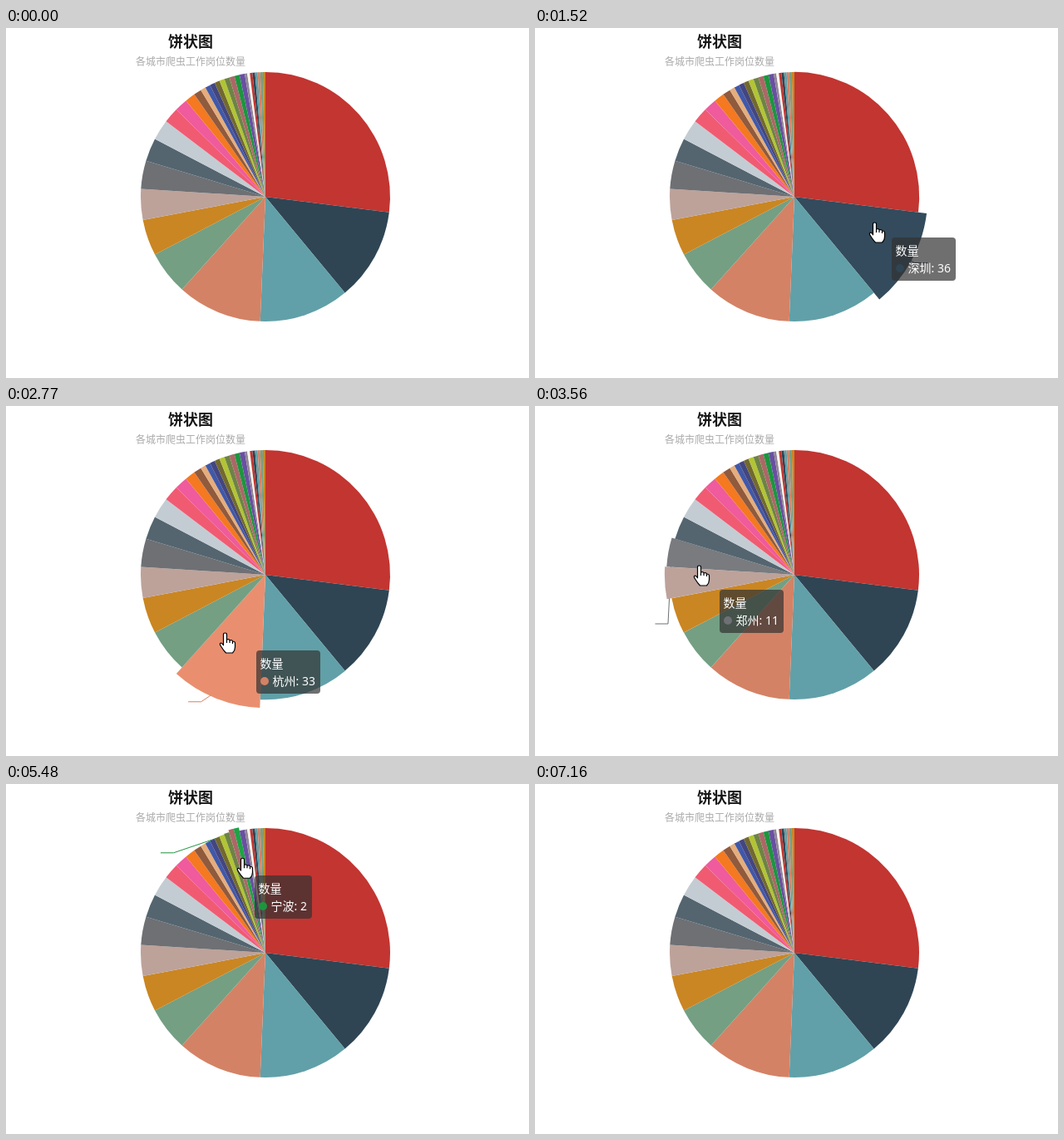
An HTML page that plays this animation: 629 by 421 pixels, repeating every 7480 ms.

```html
<!DOCTYPE html>
<html lang="zh">
<head>
<meta charset="utf-8">
<title>饼状图</title>
<style>
  html, body { margin: 0; width: 100%; height: 100%; overflow: hidden; background: #fff; }
  svg { display: block; width: 629px; height: 421px; }
  text { font-family: "Noto Sans", "Noto Sans CJK SC", "Noto Sans CJK", sans-serif; }
  .title { font-size: 18px; font-weight: 700; fill: #161616; text-anchor: middle; }
  .subtitle { font-size: 12px; fill: #aaa; text-anchor: middle; }
  #tip text { font-size: 14px; font-weight: 500; fill: #fff; }
  #hand, #arrow { fill: #fff; stroke: #000; stroke-width: 1.2; stroke-linejoin: round; }
</style>
</head>
<body>
<svg viewBox="0 0 629 421">
  <text class="title" x="222" y="22.5">饼状图</text>
  <text class="subtitle" x="222" y="45">各城市爬虫工作岗位数量</text>
  <polyline id="leader" fill="none"/>
  <g id="pie"></g>
  <g id="tip">
    <rect id="tipBox" height="52" rx="4" fill="#323232" fill-opacity=".7"/>
    <text x="4.5" y="21">数量</text>
    <circle id="tipDot" cx="10" cy="37" r="5"/>
    <text id="tipText" x="19.5" y="42"></text>
  </g>
  <path id="arrow" d="M0 0V16L4 12.5L6.5 18.5L9 17.5L6.5 11.5H11.5Z"/>
  <path id="hand" d="M-2.5 3q0-2 2-2q2 0 2 2v6q3-1 3.5 1q3-1 3.5 1q3 0 3 2v5q0 4-3 7h-8q-3-3-6-8q-2-3-.5-3.8q1.5-.8 3.5 2.6zM1.5 9v4M5 10v3M8.5 11v3"/>
</svg>
<script>
const LOOP = 7480, FIRST = 70, STEP = 77.07, STEPS = 92, SUBSTEPS = 4;
const CX = 312, CY = 203, R = 150, GROW = 10.5;
const GROW_TAU = 80, TIP_TAU = 95, TIP_OFFSET = 20, TIP_LINGER = 1.3;

const values = [81, 36, 35, 33, 17, 14, 12, 11, 9, 8, 6, 5, 4, 3,
  ...Array(9).fill(2), ...Array(8).fill(1)];
const cities = ('北京 深圳 上海 杭州 广州 成都 武汉 郑州 南京 西安 长沙 厦门 太原 苏州 合肥 ' +
  '济南 福州 天津 重庆 青岛 大连 宁波 无锡 东莞 珠海 佛山 昆明 贵阳 南昌 沈阳 海口').split(' ');
const palette = ('c23531 2f4554 61a0a8 d48265 749f83 ca8622 bda29a 6e7074 546570 c4ccd3 f05b72 ' +
  'ef5b9c f47920 905a3d e5ad7c 4058a8 444680 726930 b2c435 6d8346 ac6767 1d953f 6950a1 ' +
  '918597 f6f5ec').split(' ');

// Turning points of the mouse: [step, x, y]
const mousePath = [[0, 519, 389], [6, 430, 195], [9, 400, 145], [16, 409, 233], [19, 409, 233],
  [29, 340, 280], [35, 264, 272], [39, 233, 266], [42, 205, 211], [45, 198, 191], [50, 190, 175],
  [55, 214, 122], [60, 241, 101], [69, 281, 90], [77, 313, 76], [80, 321, 107], [89, 600, 398],
  [91, 612, 404]];

const $ = id => document.getElementById(id);
const setAttrs = (el, attrs) => { for (const k in attrs) el.setAttribute(k, attrs[k]); };
const show = (el, on) => el.setAttribute('visibility', on ? 'visible' : 'hidden');
const moveTo = (el, [x, y]) => el.setAttribute('transform', `translate(${x} ${y})`);
const approach = tau => 1 - Math.exp(-STEP / SUBSTEPS / tau);
const polar = (deg, r) => {
  const a = deg * Math.PI / 180;
  return [CX + r * Math.sin(a), CY - r * Math.cos(a)];
};

function mouseAt(k) {
  const n = Math.max(1, mousePath.findIndex(p => p[0] >= k));
  const [k0, x0, y0] = mousePath[n - 1], [k1, x1, y1] = mousePath[n];
  const f = (k - k0) / (k1 - k0);
  return [x0 + (x1 - x0) * f, y0 + (y1 - y0) * f];
}

function lift(hex) {
  const parts = hex.match(/../g).map(h => Math.min(255, parseInt(h, 16) * 1.1 | 0));
  return `rgb(${parts})`;
}

// Labels on the left side are stacked at even distances around the pie.
function leaderPoints(i, mid) {
  const side = mid < 180 ? 1 : -1;
  let [x, y] = polar(mid, R + 15);
  if (i === 3) x -= 15;
  if (i > 4) {
    y = Math.max(4, 262 - (i - 7) * 12.8);
    x = CX + 1 - Math.sqrt(Math.max(0, (R + 14) ** 2 - (y - CY) ** 2));
  }
  return [polar(mid, R), [x, y], [x + side * 15.5, y]].join(' ');
}

const total = values.reduce((a, b) => a + b);
let sum = 0;
const slices = values.map((value, i) => {
  const from = sum / total * 360;
  sum += value;
  const to = sum / total * 360, hex = palette[i % palette.length];
  const el = document.createElementNS('http://www.w3.org/2000/svg', 'path');
  $('pie').append(el);
  return { from, to, el, color: '#' + hex, bright: lift(hex), label: `${cities[i]}: ${value}`,
    tipWidth: 61 + 8 * String(value).length, leader: leaderPoints(i, (from + to) / 2) };
});

function sliceAt([x, y]) {
  const dx = x - CX, dy = y - CY;
  if (Math.hypot(dx, dy) > R) return -1;
  const deg = (Math.atan2(dx, -dy) * 180 / Math.PI + 360) % 360;
  return slices.findIndex(s => deg < s.to);
}

// Hovered slices grow and the tooltip trails the mouse, both with exponential easing.
function bakePoses() {
  const poses = [], grow = slices.map(() => 0);
  const tip = mouseAt(0).map(v => v + TIP_OFFSET);
  let last = -1, lastStep = -Infinity;
  for (let n = 0; n < STEPS * SUBSTEPS; n++) {
    const k = n / SUBSTEPS, mouse = mouseAt(k), hover = sliceAt(mouse);
    if (hover >= 0) [last, lastStep] = [hover, k];
    if (n % SUBSTEPS === 0) {
      poses.push({ mouse, hover, grow: [...grow], tip: [...tip],
        tipSlice: k - lastStep < TIP_LINGER ? last : -1 });
    }
    grow.forEach((g, i) => { grow[i] += ((i === hover) - g) * approach(GROW_TAU); });
    tip.forEach((v, i) => { tip[i] += (mouse[i] + TIP_OFFSET - v) * approach(TIP_TAU); });
  }
  return poses;
}

const poses = bakePoses();
const idle = { mouse: null, hover: -1, tipSlice: -1, grow: slices.map(() => 0) };

function draw({ mouse, hover, tip, tipSlice, grow }) {
  slices.forEach((s, i) => {
    const r = R + GROW * grow[i];
    setAttrs(s.el, {
      d: `M${CX} ${CY}L${polar(s.from, r)}A${r} ${r} 0 0 1 ${polar(s.to, r)}Z`,
      fill: i === hover ? s.bright : s.color
    });
  });

  show($('leader'), hover >= 0);
  if (hover >= 0) setAttrs($('leader'), { points: slices[hover].leader, stroke: slices[hover].color });

  show($('tip'), tipSlice >= 0);
  if (tipSlice >= 0) {
    const s = slices[tipSlice];
    moveTo($('tip'), tip.map(Math.round));
    $('tipBox').setAttribute('width', s.tipWidth);
    $('tipDot').setAttribute('fill', s.color);
    $('tipText').textContent = s.label;
  }

  show($('hand'), mouse && hover >= 0);
  show($('arrow'), mouse && hover < 0);
  if (mouse) moveTo($(hover >= 0 ? 'hand' : 'arrow'), mouse);
}

function frame() {
  const t = performance.now() % LOOP;
  const step = t < FIRST ? -1 : Math.floor((t - FIRST) / STEP + 0.35);
  draw(poses[step] || idle);
  requestAnimationFrame(frame);
}
frame();
</script>
</body>
</html>
```
